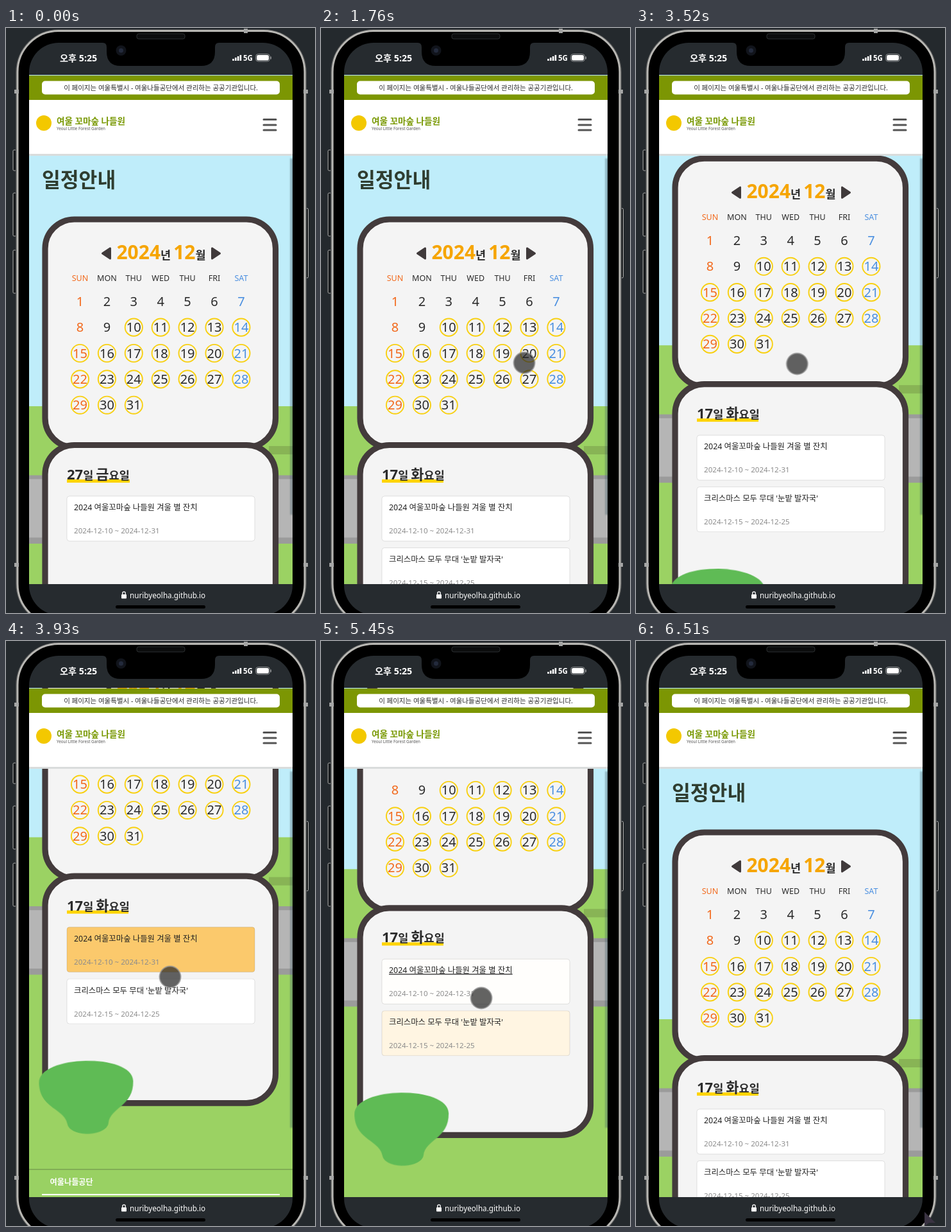
An HTML page that plays this animation: 482 px wide and 911 px high, repeating every 6.58 s.

```html
<!DOCTYPE html>
<html lang="ko">
<head>
<meta charset="utf-8">
<title>일정안내</title>
<style>
html, body { margin: 0; width: 100%; height: 100%; overflow: hidden; background: #24292d; }
svg { display: block; width: 482px; height: 911px; }
text { font-family: "Noto Sans", "Noto Sans CJK KR", sans-serif; fill: #2b2b2b; }
.mid { text-anchor: middle; }
.bold { font-weight: 700; }
.white { fill: #fff; }
.big { font-size: 22px; }
.sun { fill: #f2691c; }
.sat { fill: #4a8fe0; }
.year { font-size: 30px; fill: #f6a500; }
.card { fill: #f4f4f4; stroke: #433b3c; stroke-width: 9.2; }
.event rect { fill: #fff; stroke: rgba(0, 0, 0, .11); }
.event .name { font-size: 12.4px; fill: #222; }
.event .date { font-size: 11.6px; fill: #8c8c8c; }

.scroll { animation: scroll 6580ms linear infinite; }
.pointer { animation: pointer 6580ms linear infinite; }
.mascot { transform-origin: 130px 1045px; animation: sway 1645ms ease-in-out infinite; }
.dec, .jan, .before, .after, .extra, .arrow, .l1, .l2 { animation: 6580ms step-end infinite; }
.dec { animation-name: dec; }
.jan { animation-name: jan; }
.before { animation-name: before; }
.after { animation-name: after; }
.extra { animation-name: extra; }
.arrow { animation-name: arrow; }
.event .l1 { animation-name: line1; }
.event .l2 { animation-name: line2; }
.event .h1 { animation: fill1 6580ms linear infinite; }
.event .h2 { animation: fill2 6580ms linear infinite; }

@keyframes scroll {
  0%, 51% { transform: translateY(0); }
  57.75% { transform: translateY(-255px); }
  59.73% { transform: translateY(-283px); }
  63.2% { transform: translateY(-400px); }
  67%, 79.79% { transform: translateY(-480px); }
  82.83% { transform: translateY(-234px); }
  88.91% { transform: translateY(-80px); }
  92.7%, 100% { transform: translateY(0); }
}
@keyframes pointer {
  0%, 1.05% { transform: translate(428px, 830px); opacity: 0; }
  1.06% { transform: translate(428px, 830px); opacity: 1; }
  3.04%, 5.93% { transform: translate(206px, 451px); }
  9.5%, 19.8% { transform: translate(200px, 506px); }
  25.68% { transform: translate(288px, 598px); }
  26.75% { transform: translate(317px, 522px); }
  30%, 37.08% { transform: translate(327px, 351px); }
  43.5% { transform: translate(163px, 357px); }
  44.38%, 48.3% { transform: translate(159px, 357px); }
  51.67% { transform: translate(250px, 523px); }
  59.73% { transform: translate(256px, 523px); }
  69% { transform: translate(251px, 520px); }
  71.12%, 74% { transform: translate(140px, 527px); }
  78.42% { transform: translate(250px, 550px); }
  79.79%, 82.83% { transform: translate(250px, 556px); }
  89.97% { transform: translate(255px, 556px); }
  97.8% { transform: translate(446px, 888px); opacity: 1; }
  97.81%, 100% { transform: translate(446px, 888px); opacity: 0; }
}
@keyframes sway {
  0%, 100% { transform: rotate(1.5deg); }
  50% { transform: rotate(-1.5deg); }
}
@keyframes dec { 0%, 46.4% { opacity: 1; } 33.4% { opacity: 0; } 100% { opacity: 1; } }
@keyframes jan { 0%, 46.4% { opacity: 0; } 33.4% { opacity: 1; } 100% { opacity: 0; } }
@keyframes before { 0% { opacity: 1; } 13.68%, 100% { opacity: 0; } }
@keyframes after { 0% { opacity: 0; } 13.68%, 100% { opacity: 1; } }
@keyframes extra { 0% { opacity: 0; } 16.26%, 100% { opacity: 1; } }
@keyframes arrow { 0% { opacity: 0; } 98.9%, 100% { opacity: 1; } }
@keyframes line1 {
  0%, 59.2%, 85.2%, 100% { text-decoration: none; }
  56.4%, 82.7% { text-decoration: underline; }
}
@keyframes line2 {
  0%, 61.9%, 82.6%, 100% { text-decoration: none; }
  59.85%, 81.7% { text-decoration: underline; }
}
@keyframes fill1 {
  0%, 56.4%, 62.5%, 82.8%, 88.5%, 100% { fill: #fff; }
  58.7%, 59.8%, 85.2% { fill: #fbc96c; }
}
@keyframes fill2 {
  0%, 59.85%, 65.5%, 81.7%, 84%, 100% { fill: #fff; }
  61.9% { fill: #fbc96c; }
  82.5% { fill: #fdeac8; }
  82.83% { fill: #fff5e2; }
}
</style>
</head>
<body>
<svg viewBox="0 0 482 911">
  <defs>
    <clipPath id="view"><rect x="36" y="73" width="411" height="793"/></clipPath>
    <filter id="soft" x="-3" width="7"><feGaussianBlur stdDeviation="1"/></filter>
  </defs>

  <!-- phone -->
  <rect width="482" height="911" fill="#24292d"/>
  <g fill="#15181a" stroke="#b4b4b2">
    <rect x="11" y="190" width="5" height="32" rx="1.5"/>
    <rect x="11" y="257" width="5" height="67" rx="1.5"/>
    <rect x="11" y="346" width="5" height="67" rx="1.5"/>
    <rect x="467" y="281" width="4.500" height="108" rx="1.5"/>
  </g>
  <rect x="15" y="2" width="454" height="930" rx="67" fill="#4d4f50"/>
  <rect x="18" y="4.500" width="448" height="925" rx="64" stroke="#b8b7b3" stroke-width="3"/>
  <g fill="#a5a6a5">
    <rect x="13" y="96" width="7" height="6"/><rect x="464" y="96" width="7" height="6"/>
    <rect x="13" y="833" width="7" height="6"/><rect x="464" y="833" width="7" height="6"/>
    <rect x="371" y="1" width="6" height="7"/>
  </g>
  <rect x="204" y="9" width="75" height="8" rx="3" fill="#0b0c0d" stroke="#2b2e30"/>
  <rect x="36" y="23" width="411" height="891" rx="46" fill="#262b2f"/>
  <path d="M151 23q6 0 6 7v7q0 22 22 22h125q22 0 22-22v-7q0-7 6-7z"/>
  <circle cx="179.500" cy="35" r="8" fill="#11141b"/>
  <circle cx="179.500" cy="35" r="3.500" fill="#232a3c"/>

  <!-- status bar -->
  <text x="84" y="52" font-size="14.200" font-weight="600" class="white">오후 5:25</text>
  <path d="M354.500 51v-3M358.300 51v-5M362.100 51v-7M365.900 51v-9" stroke="#fff" stroke-width="2.600"/>
  <text x="370" y="51" font-size="11.500" class="bold white">5G</text>
  <rect x="389.500" y="40.500" width="22" height="11.500" rx="4" fill="none" stroke="#8d9092"/>
  <rect x="391" y="42" width="19" height="8.500" rx="2.800" fill="#fff"/>
  <rect x="412.500" y="44.500" width="1.500" height="4" fill="#8d9092"/>

  <!-- page -->
  <g clip-path="url(#view)">
    <rect x="36" y="73" width="411" height="793" fill="#bfedfa"/>
    <g class="scroll">
      <rect x="36" y="589" width="411" height="800" fill="#9bd263"/>
      <rect x="410" y="651" width="37" height="13" fill="#88b455"/>
      <rect x="36" y="696.500" width="411" height="106.500" fill="#9b9b9b"/>
      <rect x="36" y="702.500" width="411" height="91" fill="#b5b5b5"/>
      <text x="56" y="248" font-size="31.300" class="bold" style="fill:#2f3d30">일정안내</text>

      <rect class="card" x="61" y="298" width="359.500" height="355" rx="45.500"/>
      <rect class="card" x="61" y="649.500" width="359.500" height="353.500" rx="45.500"/>
      <g id="week" font-size="12.500"></g>
      <g class="dec" id="dec"></g>
      <g class="jan" id="jan"></g>

      <g class="before">
        <rect x="95" y="703" width="98" height="5" fill="#ffd400"/>
        <text x="95" y="703" font-size="17.500" class="bold"><tspan class="big">27</tspan>일<tspan dx="4" class="big">금</tspan>요일</text>
      </g>
      <g class="after">
        <rect x="95" y="703" width="96" height="5" fill="#ffd400"/>
        <text x="95" y="703" font-size="17.500" class="bold"><tspan class="big">17</tspan>일<tspan dx="4" class="big">화</tspan>요일</text>
      </g>

      <g class="event">
        <rect class="h1" x="95" y="729" width="293" height="70" rx="4"/>
        <text class="name l1" x="106" y="751">2024 여울꼬마숲 나들원 겨울 별 잔치</text>
        <text class="date" x="106" y="787">2024-12-10 ~ 2024-12-31</text>
      </g>
      <g class="extra">
        <g class="event">
          <rect class="h2" x="95" y="809.500" width="293" height="70" rx="4"/>
          <text class="name l2" x="106" y="832">크리스마스 모두 무대 '눈밭 발자국'</text>
          <text class="date" x="106" y="868">2024-12-15 ~ 2024-12-25</text>
        </g>
      </g>

      <path class="mascot" d="M53 970C53 926 200 926 200 970C200 1010 163 1010 160 1035C156 1056 100 1056 96 1035C92 1010 53 1010 53 970Z" fill="#5fbb55"/>

      <rect x="36" y="1105" width="411" height="284" fill="#99d163"/>
      <rect x="36" y="1105" width="411" height="2" fill="#7ba552"/>
      <g id="links" font-size="12.200"></g>
      <circle cx="93" cy="1352" r="25" fill="#fff"/>
    </g>

    <!-- fixed header -->
    <rect x="36" y="74" width="411" height="38" fill="#7c9603"/>
    <rect x="56" y="82.500" width="371" height="21" rx="5" fill="#fff"/>
    <text x="241.500" y="97" font-size="10.500" class="mid">이 페이지는 여울특별시 - 여울나들공단에서 관리하는 공공기관입니다.</text>
    <rect x="36" y="112" width="411" height="87" fill="#d9dcdc"/>
    <rect x="36" y="112" width="411" height="84" fill="#fff"/>
    <circle cx="59" cy="148" r="12" fill="#f3c800"/>
    <text x="79" y="150" font-size="13.600" class="bold" style="fill:#789800">여울 꼬마숲 나들원</text>
    <text x="79" y="158.500" font-size="6.300" style="fill:#555">Yeoul Little Forest Garden</text>
    <path d="M402 142.500h19M402 151h19M402 159h19" stroke="#555" stroke-width="3" stroke-linecap="round"/>
    <rect x="443.500" y="203" width="4" height="555" fill="#456068" opacity=".45" filter="url(#soft)"/>
  </g>

  <!-- address bar -->
  <rect x="180" y="882" width="8" height="6.500" rx="1" fill="#fff"/>
  <path d="M181.800 882v-2a2.200 2.200 0 0 1 4.400 0v2" fill="none" stroke="#fff" stroke-width="1.300"/>
  <text x="193" y="887.500" font-size="11.700" class="white">nuribyeolha.github.io</text>
  <rect x="171" y="899" width="140" height="5" rx="2.500"/>

  <path class="arrow" d="M450 889l17 17-10 0-7 5z" fill="#3a3342"/>
  <circle class="pointer" r="16.500" fill="#282828" fill-opacity=".72" stroke="#969696" stroke-opacity=".75" stroke-width="2"/>
</svg>
<script>
const byId = id => document.getElementById(id);
const colX = col => 115.5 + 41.9 * col;
const tone = col => col === 0 ? 'sun' : col === 6 ? 'sat' : '';
const label = (x, y, cls, s) => `<text x="${x}" y="${y}" class="mid ${cls}">${s}</text>`;

function triangle(x, dir) {
  return `<path d="M${x} 351l${12 * dir}-8v16z" fill="#403a3b" stroke="#403a3b" stroke-width="3" stroke-linejoin="round"/>`;
}

function month(year, num, start, from, to, half) {
  let out = triangle(242 - half, 1) + triangle(242 + half, -1) +
    `<text x="242" y="360" font-size="17.5" class="mid bold"><tspan class="year">${year}</tspan>년` +
    `<tspan dx="4" class="year">${num}</tspan>월</text><g font-size="20">`;
  for (let day = 1; day <= 31; day++) {
    const cell = day + start - 1, col = cell % 7;
    const x = colX(col), y = 425.8 + 40.35 * Math.floor(cell / 7);
    if (day >= from && day <= to)
      out += `<circle cx="${x}" cy="${y}" r="13.6" fill="none" stroke="#f8d010" stroke-width="1.9"/>`;
    out += label(x, y + 7, tone(col), day);
  }
  return out + '</g>';
}

byId('week').innerHTML = ['SUN', 'MON', 'THU', 'WED', 'THU', 'FRI', 'SAT']
  .map((s, i) => label(colX(i), 394, tone(i), s)).join('');
byId('dec').innerHTML = month(2024, 12, 0, 10, 31, 91.5);
byId('jan').innerHTML = month(2025, 1, 3, 5, 21, 82.5);
byId('links').innerHTML = ['여울나들공단', '찾아오시는길', '개인정보처리방침', '고객서비스헌장', '사이트맵']
  .map((s, i) => {
    const y = 1130.5 + 38.3 * i;
    const look = i === 2 ? 'fill:#555;font-weight:700' : 'fill:#fff;font-weight:900';
    return `<text x="68.5" y="${y}" style="${look}">${s}</text>` +
      `<rect x="56" y="${y + 14}" width="371" height="2" fill="#fff"/>`;
  }).join('');
</script>
</body>
</html>
```
